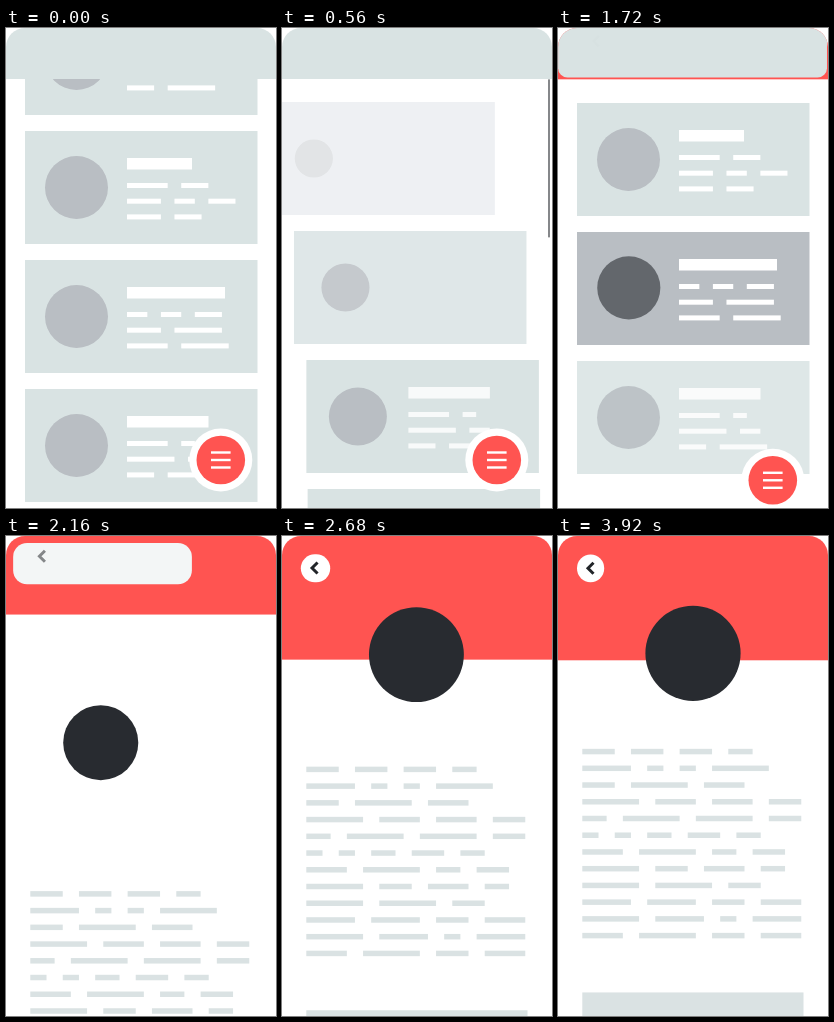
Write an HTML page with a canvas that moves like this. It is 270 px wide and 480 px high and loops after 3.96 s.

```html
<!DOCTYPE html>
<html lang="en">
<head>
<meta charset="utf-8">
<title>List to detail</title>
<style>
  html, body { margin: 0; width: 100%; height: 100%; overflow: hidden; background: #fff; }
  canvas { display: block; width: 270px; height: 480px; }
</style>
</head>
<body>
<canvas id="stage"></canvas>
<script>
const W = 270, H = 480, LOOP = 3960;
const canvas = document.getElementById('stage');
const ctx = canvas.getContext('2d');
const dpr = window.devicePixelRatio || 1;
canvas.width = W * dpr;
canvas.height = H * dpr;

const WHITE = [255, 255, 255];
const MIST = [217, 227, 227];
const STONE = [185, 190, 195];
const INK = [40, 43, 48];
const RED = '#ff5451';

// Layout: list
const HEADER = 51, LEFT = 19, TOP = 75, PITCH = 129;
const CARD_W = 232.5, CARD_H = 113, CARD_COUNT = 9;
const SCROLL = 746, PICKED = 1;
const AVATAR = { x: 51.5, y: 56.5, r: 31.5 };
const CARD_TEXT = [
  { title: 65, rows: ['64', '534', '54'] },
  { title: 98, rows: ['334', '57', '67'] },
  { title: 81.5, rows: ['62', '73', '47'] }
];

// Layout: detail page, word lengths per line
const BODY = ['4443', '6227', '475', '7554', '3774', '22343',
              '5734', '7453', '774', '6645', '7626', '5745'];

const clamp = v => Math.min(1, Math.max(0, v));
const ramp = (t, a, b) => clamp((t - a) / (b - a));
const lerp = (a, b, k) => a + (b - a) * k;
const rgb = c => `rgb(${c.map(Math.round).join(',')})`;
const mix = (a, b, k) => rgb(a.map((v, i) => lerp(v, b[i], k)));
const inOut = (u, n) => u < 0.5 ? (2 * u) ** n / 2 : 1 - (2 - 2 * u) ** n / 2;

function rect(x, y, w, h, fill) {
  ctx.fillStyle = fill;
  ctx.fillRect(x, y, w, h);
}

function disc(x, y, r, fill) {
  ctx.fillStyle = fill;
  ctx.beginPath();
  ctx.arc(x, y, r, 0, 2 * Math.PI);
  ctx.fill();
}

function roundRect(x, y, w, h, r) {
  ctx.beginPath();
  ctx.moveTo(x + r, y);
  ctx.arcTo(x + w, y, x + w, y + h, r);
  ctx.arcTo(x + w, y + h, x, y + h, r);
  ctx.arcTo(x, y + h, x, y, r);
  ctx.arcTo(x, y, x + w, y, r);
  ctx.closePath();
}

function words(row, x, y, unit, h, fill) {
  for (const n of row) {
    rect(x, y, n * unit, h, fill);
    x += (+n + 2) * unit;
  }
}

// Entry progress of a card; it settles slowly after the overshoot
function entry(i, t) {
  if (i > 4) return 1;
  const u = (t - 440 + 63 * i) / 420;
  return clamp(u > 0.667 ? 0.667 + (u - 0.667) * 0.22 : u);
}

function leaving(i, t) {
  if (i === PICKED) return ramp(t, 1800, 2040);
  const start = [1760, 0, 1700][i] || 1560;
  return ramp(t, start, start + 150);
}

function drawCard(i, t, scroll) {
  const y = TOP + i * PITCH - scroll;
  const alpha = 1 - leaving(i, t);
  const u = entry(i, t);
  if (y > H || y + CARD_H < HEADER || !alpha || !u) return;

  const v = u - 1;
  const x = LEFT + 180 * (2 * v ** 3 + v * v);
  const tint = ramp(u, 0.14, 0.5);
  const press = i === PICKED ? ramp(t, 1550, 1720) : 0;

  ctx.globalAlpha = alpha;
  rect(x, y, CARD_W, CARD_H,
    press ? mix(MIST, STONE, press) : mix([253, 249, 255], MIST, tint));
  if (!press) {
    const r = Math.min(AVATAR.r, 19 + (u - 0.285) * 33);
    disc(x + AVATAR.x, y + AVATAR.y, r, mix(WHITE, STONE, tint));
  }
  ctx.globalAlpha = alpha * ramp(u, 0.44, 0.62);
  const text = CARD_TEXT[i % 3];
  rect(x + 102, y + 27, text.title, 11.5, '#fff');
  text.rows.forEach((row, k) => words(row, x + 102, y + 52 + k * 15.7, 6.78, 5, '#fff'));
  ctx.globalAlpha = 1;
}

function drawList(t) {
  const scroll = SCROLL * (1 - inOut(ramp(t, 30, 575), 2));
  for (let i = 0; i < CARD_COUNT; i++) drawCard(i, t, scroll);

  ctx.globalAlpha = ramp(t, 30, 110) * (1 - ramp(t, 1240, 1400));
  rect(266, HEADER + scroll / SCROLL * 271, 2, 158, '#85878a');
  ctx.globalAlpha = 1;
}

function drawMenuButton(t) {
  const x = 214.8, y = 432 + 90 * ((Math.max(t, 1580) - 1580) / 297) ** 2;
  if (y > H + 40) return;
  disc(x, y, 31.5, '#fff');
  disc(x, y, 24.3, RED);
  for (const dy of [-7.5, 0, 7.5]) rect(x - 9.8, y + dy - 1.2, 19.6, 2.4, '#fff');
}

function drawBody(t) {
  const shift = 143 * Math.exp((2160 - t) / 251);
  if (shift > 290) return;
  BODY.forEach((row, i) => words(row, 24.3, 212.7 + i * 16.73 + shift, 8.11, 5.5, '#dae2e3'));
  rect(24.3, 456.3 + shift, 221.2, 60, '#dae2e3');
}

// The list header shrinks into the back button over the red panel
function drawHeader(t, p) {
  if (t >= 1640) rect(0, 0, W, lerp(HEADER, 124.3, p), RED);
  const early = ramp(t, 1640, 1720);
  const x = 19 * p, y = 18.5 * p;
  const right = lerp(W, 46.2, p);
  const bottom = lerp(HEADER - 1.4 * early, 46.2, p);
  const r = Math.min(14 * ramp(t, 1640, 1760), (right - x) / 2, (bottom - y) / 2);
  ctx.fillStyle = mix(MIST, WHITE, clamp(p * 1.8));
  roundRect(x, y, right - x, bottom - y, r);
  ctx.fill();

  const ax = lerp(38, 32.5, p), ay = lerp(13, 32.2, p);
  ctx.globalAlpha = clamp(p * 1.4);
  ctx.strokeStyle = '#222529';
  ctx.lineWidth = 3;
  ctx.beginPath();
  ctx.moveTo(ax + 3, ay - 5.5);
  ctx.lineTo(ax - 2.5, ay);
  ctx.lineTo(ax + 3, ay + 5.5);
  ctx.stroke();
  ctx.globalAlpha = 1;
}

function drawHero(t, p) {
  if (t <= 1550) return;
  const x = lerp(LEFT + AVATAR.x, 135, p);
  const y = lerp(TOP + PICKED * PITCH + AVATAR.y, 117.3, p);
  disc(x, y, lerp(AVATAR.r, 47.6, p), mix(STONE, INK, ramp(t, 1550, 1838)));
}

function draw(t) {
  const p = inOut(ramp(t, 1590, 2846), 3);
  ctx.setTransform(dpr, 0, 0, dpr, 0, 0);
  rect(0, 0, W, H, '#fff');
  ctx.save();
  roundRect(0, 0, W, H + 40, 19);
  ctx.clip();
  drawList(t);
  drawMenuButton(t);
  drawBody(t);
  drawHeader(t, p);
  drawHero(t, p);
  ctx.restore();
}

const begin = performance.now();
function tick() {
  draw((performance.now() - begin) % LOOP);
  requestAnimationFrame(tick);
}
tick();
</script>
</body>
</html>
```
